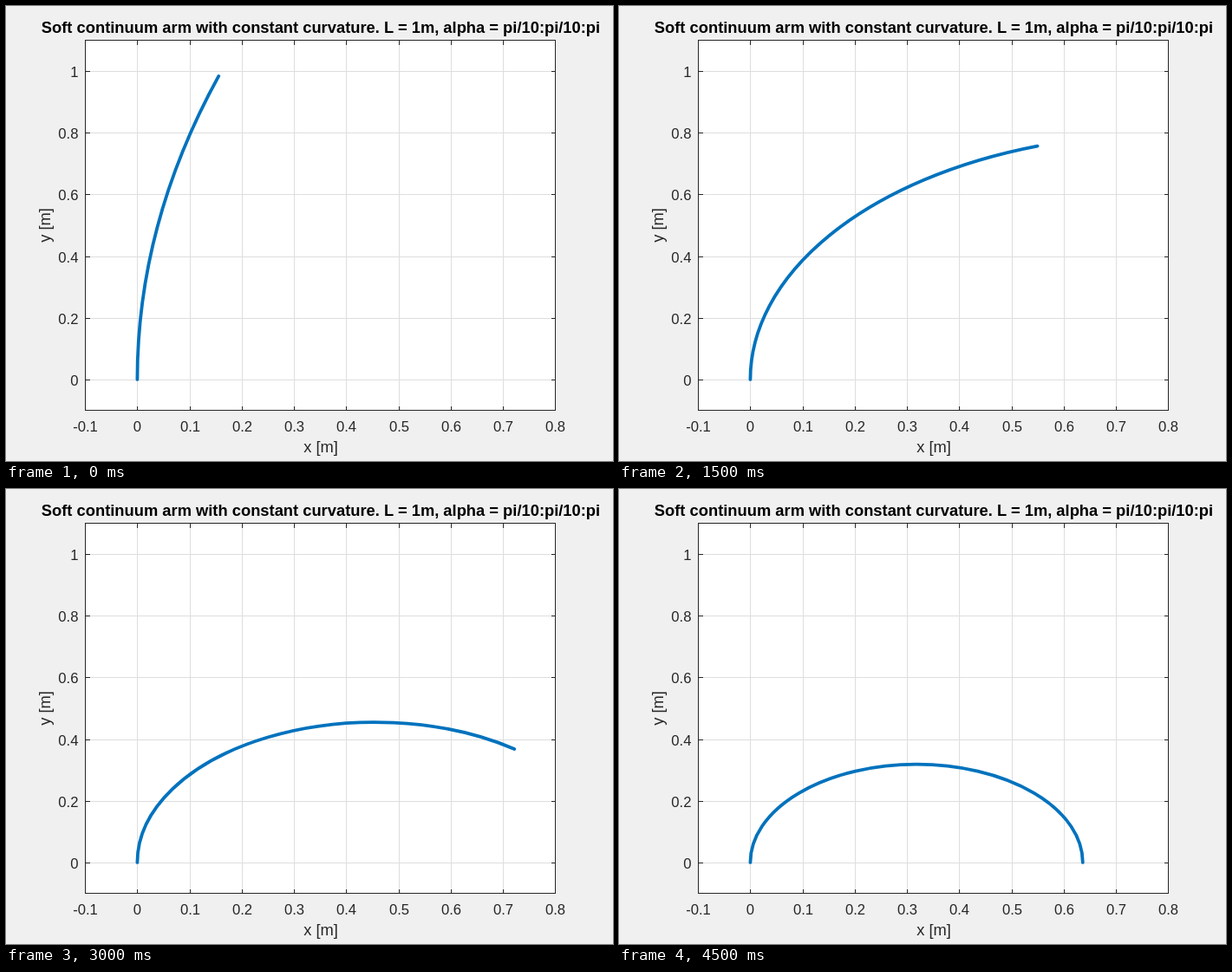
An HTML page for the animation above (5 s loop, 700 by 525 pixels).

```html
<!DOCTYPE html>
<html lang="en">
<head>
<meta charset="utf-8">
<title>Constant curvature arm</title>
<style>
  html, body { margin: 0; width: 100%; height: 100%; overflow: hidden; background: #f0f0f0; }
  svg { display: block; width: 700px; height: 525px; }
  text { font: 16.67px "Liberation Sans", Arial, sans-serif; fill: #262626; text-anchor: middle; }
  .label { font-size: 18.33px; }
  .title { font-size: 18.33px; font-weight: bold; fill: #000; }
  .y-tick { text-anchor: end; }
  #grid, #axes { fill: none; stroke-width: 1; shape-rendering: crispEdges; }
  #grid { stroke: #dedede; }
  #axes { stroke: #262626; }
  #arm { fill: none; stroke: #0072bd; stroke-width: 3.8; stroke-linecap: round; }
</style>
</head>
<body>
<svg viewBox="0 0 700 525">
  <rect x="91" y="39" width="543" height="428" fill="#fff"/>
  <path id="grid"/>
  <path id="axes"/>
  <path id="arm"/>
  <g id="ticks"></g>
  <text class="title" x="363" y="31">Soft continuum arm with constant curvature. L = 1m, alpha = pi/10:pi/10:pi</text>
  <text class="label" x="363" y="515">x [m]</text>
  <text class="label" transform="translate(50.5 253) rotate(-90)">y [m]</text>
</svg>
<script>
const LEFT = 91.5, RIGHT = 633.5, TOP = 39.5, BOTTOM = 466.5, TICK = 5;
const STEP_MS = 500, STEPS = 10;
const scaleX = (RIGHT - LEFT) / 0.9;
const scaleY = (BOTTOM - TOP) / 1.2;
const toX = x => 91.2 + (x + 0.1) * scaleX;
const toY = y => BOTTOM - (y + 0.1) * scaleY;
const snap = v => Math.round(v) + 0.5;
const el = id => document.getElementById(id);

function addText(content, x, y, className = "") {
  const node = document.createElementNS("http://www.w3.org/2000/svg", "text");
  node.setAttribute("x", x);
  node.setAttribute("y", y);
  node.setAttribute("class", className);
  node.textContent = content;
  el("ticks").append(node);
}

function drawAxes() {
  let grid = "";
  let axes = `M${LEFT} ${TOP}H${RIGHT}V${BOTTOM}H${LEFT}Z`;
  for (let i = -1; i <= 8; i++) {
    const x = snap(toX(i / 10));
    addText(i / 10, x, 491);
    if (i < 0 || i > 7) continue;
    grid += `M${x} ${TOP}V${BOTTOM}`;
    axes += `M${x} ${TOP}v${TICK}M${x} ${BOTTOM}v${-TICK}`;
  }
  for (let i = 0; i <= 5; i++) {
    const y = snap(toY(i / 5));
    addText(i / 5, 83.5, y + 6, "y-tick");
    grid += `M${LEFT} ${y}H${RIGHT}`;
    axes += `M${LEFT} ${y}h${TICK}M${RIGHT} ${y}h${-TICK}`;
  }
  el("grid").setAttribute("d", grid);
  el("axes").setAttribute("d", axes);
}

// A unit-length arm bent through alpha is an arc of radius 1 / alpha.
function armPath(alpha) {
  const tipX = toX((1 - Math.cos(alpha)) / alpha);
  const tipY = toY(Math.sin(alpha) / alpha);
  return `M${toX(0)} ${toY(0)}A${scaleX / alpha} ${scaleY / alpha} 0 0 1 ${tipX} ${tipY}`;
}

let shown = -1;
function render() {
  const step = Math.floor(performance.now() / STEP_MS) % STEPS;
  if (step !== shown) {
    shown = step;
    el("arm").setAttribute("d", armPath((step + 1) * Math.PI / STEPS));
  }
  requestAnimationFrame(render);
}

drawAxes();
render();
</script>
</body>
</html>
```
